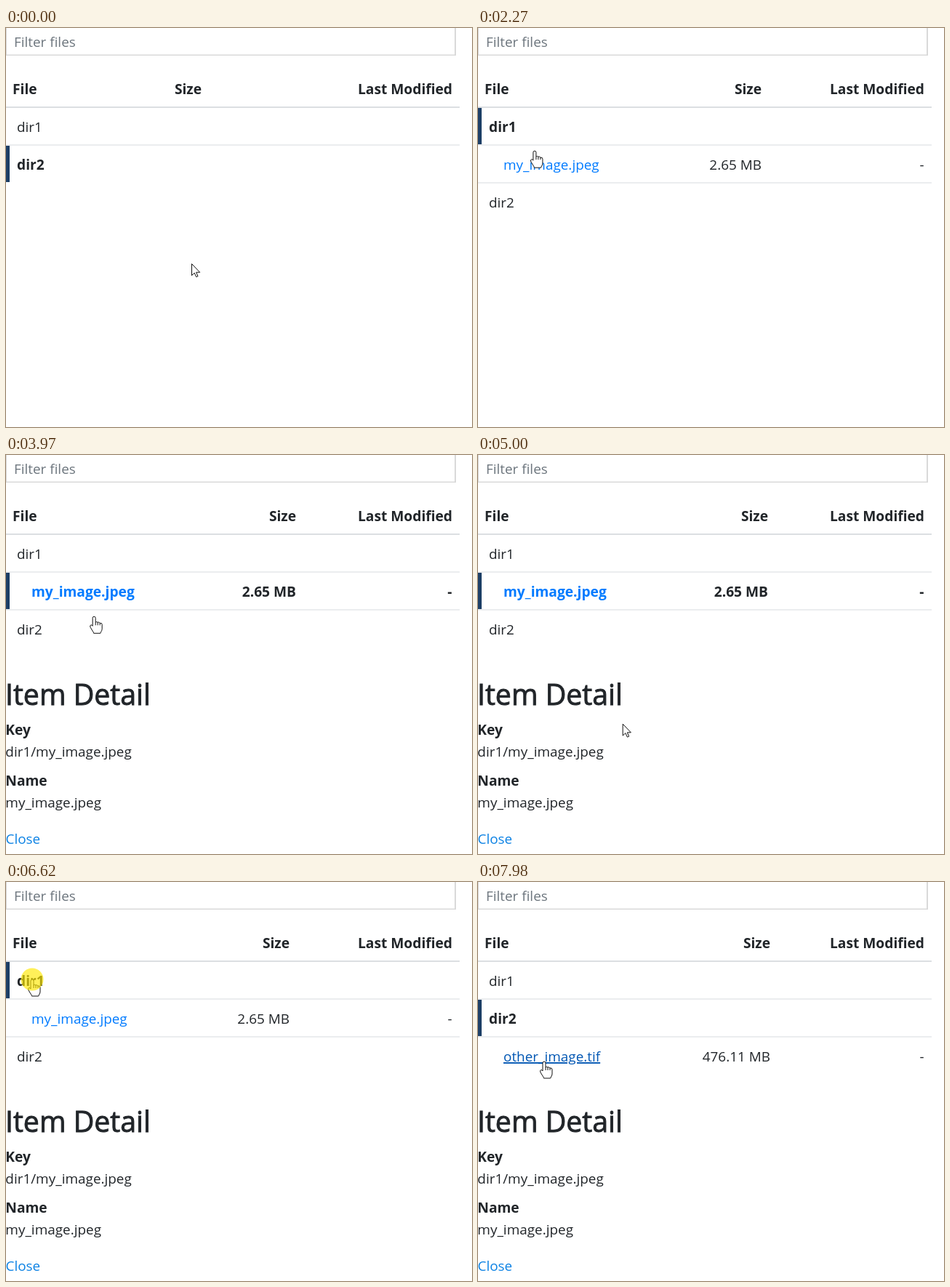
Recreate the animation shown at these times as an HTML page. Size 641x549 px, loop 8000 ms.

```html
<!DOCTYPE html>
<html lang="en">
<head>
<meta charset="utf-8">
<title>File browser</title>
<style>
  html, body { margin: 0; width: 100%; height: 100%; overflow: hidden; background: #fff; }
  svg { display: block; }
  text { font: 18.9px "Open Sans", "Noto Sans", sans-serif; fill: #212529; }
  .bold { font-size: 19.2px; font-weight: 700; }
  .right { text-anchor: end; }
  .hint { fill: #6c757d; }
  .title { font-size: 39.3px; stroke: #212529; stroke-width: .9; }
  .link { fill: #007bff; }
  .close { fill: #0c82e4; }
  .hover { fill: #0056b3; text-decoration: underline; }
  #cursor path { fill: #fff; stroke: #111; stroke-linejoin: round; }
</style>
</head>
<body>
<svg width="641" height="549" viewBox="0 0 641 549">
  <g id="page"></g>
  <g id="cursor">
    <path id="arrow" d="M.5 .5V16.5L4.2 13L6.7 18.5L9 17.5L6.6 12.2H11.7Z"/>
    <g id="hand">
      <path d="M-2 13V2Q-2 0 0 0T2 2V8Q3.5 6.5 5 8Q6.5 7 8 9Q11 8.5 11 11V17Q11 19 9.5 21L8.7 23H-.5L-1 21.5L-5 15Q-6.5 12 -4 11.5Q-3 11.5 -2 13Z"/>
      <path d="M2 8V12M5 8V12M8 9V12"/>
    </g>
    <circle id="click" r="15.5" fill="#ffe800" opacity=".65"/>
  </g>
</svg>
<script>
const LOOP = 8000, TOP = 110, ROW = 52, FLASH = 130;
const $ = id => document.getElementById(id);

const dir1 = { name: 'dir1' }, dir2 = { name: 'dir2' };
const jpeg = { name: 'my_image.jpeg', size: '2.65 MB' };
const tif = { name: 'other_image.tif', size: '476.11 MB' };

// Each click opens the next view; sizeEdge is the right edge of the size column.
const views = [
  { start: 0, rows: [dir1, dir2], selected: dir2, sizeEdge: 269 },
  { start: 1560, rows: [dir1, jpeg, dir2], selected: dir1, sizeEdge: 390 },
  { start: 3330, rows: [dir1, jpeg, dir2], selected: jpeg, sizeEdge: 399, detail: true },
  { start: 6270, rows: [dir1, jpeg, dir2], selected: dir1, sizeEdge: 390, detail: true },
  { start: 6740, rows: [dir1, dir2], selected: dir1, sizeEdge: 269, detail: true },
  { start: 7520, rows: [dir1, dir2, tif], selected: dir2, sizeEdge: 402, detail: true }
];

// The pointer rests between moves.
const home = { x: 255, y: 324 };
const moves = [
  { from: 180, to: 230, x: 255, y: 305 },
  { from: 430, to: 1040, x: 105, y: 154 },
  { from: 1040, to: 1230, x: 71, y: 139 },
  { from: 1850, to: 2520, x: 82, y: 187 },
  { from: 3830, to: 3970, x: 121, y: 222 },
  { from: 3970, to: 4640, x: 228, y: 420 },
  { from: 4820, to: 5740, x: 79, y: 164 },
  { from: 5740, to: 6120, x: 36, y: 134 },
  { from: 7190, to: 7400, x: 50, y: 186 },
  { from: 7640, to: 7980, x: 91, y: 247 }
];

function pointer(t) {
  let { x, y } = home;
  for (const move of moves) {
    const k = Math.min(1, Math.max(0, (t - move.from) / (move.to - move.from)));
    x += (move.x - x) * k;
    y += (move.y - y) * k;
  }
  return [x, y];
}

const text = (x, y, s, cls = '') => `<text x="${x}" y="${y}" class="${cls}">${s}</text>`;
const rect = (x, y, w, h, fill) =>
  `<rect x="${x}" y="${y}" width="${w}" height="${h}" fill="${fill}"/>`;

function field(y, label, value) {
  return text(-.7, y, label, 'bold') + text(-.7, y + 30, value);
}

function detail(y) {
  return text(-1, y + 78, 'Item Detail', 'title') +
    field(y + 119, 'Key', 'dir1/my_image.jpeg') +
    field(y + 189, 'Name', 'my_image.jpeg') +
    text(-.5, y + 269, 'Close', 'close');
}

function page(view, hovered) {
  const { rows, selected, sizeEdge } = view;
  let out = rect(0, 0, 1, 38, '#d9d9d9') + rect(617, 0, 2, 38, '#d9d9d9') +
    rect(0, 36.5, 619, 1.5, '#d9d9d9') + text(11, 26, 'Filter files', 'hint') +
    text(9, 91, 'File', 'bold') + text(sizeEdge, 91, 'Size', 'bold right') +
    text(614, 91, 'Last Modified', 'bold right') + rect(0, TOP - 2, 624, 2, '#dcdfe2');
  rows.forEach((row, i) => {
    const top = TOP + i * ROW, base = top + 33;
    const weight = row === selected ? 'bold' : '';
    if (i) out += rect(0, top - 2, 624, 2, '#ebedef');
    if (weight) out += rect(0, top, 5, 50, '#1d3f66');
    if (row.size) {
      out += text(35, base, row.name, `${weight} ${row === hovered ? 'hover' : 'link'}`) +
        text(sizeEdge, base, row.size, weight + ' right') +
        text(613.5, base, '-', weight + ' right');
    } else out += text(15, base, row.name, weight);
  });
  return view.detail ? out + detail(TOP + rows.length * ROW) : out;
}

const show = (id, on) => { $(id).style.display = on ? '' : 'none'; };

let shown = '';
function draw(now) {
  const t = now % LOOP;
  const [x, y] = pointer(t);
  const view = views.filter(v => v.start <= t).pop();
  const at = Math.floor((y - TOP) / ROW);
  const over = view.rows[at];
  const inText = Math.abs(y - TOP - at * ROW - ROW / 2) < 14 && x > 35 && x < 168;
  const html = page(view, over && over.size && inText ? over : null);
  if (html !== shown) $('page').innerHTML = shown = html;

  $('cursor').setAttribute('transform', `translate(${x} ${y})`);
  show('hand', over);
  show('arrow', !over);
  show('click', views.some(v => t < v.start && t >= v.start - FLASH));
  requestAnimationFrame(draw);
}
requestAnimationFrame(draw);
</script>
</body>
</html>
```
